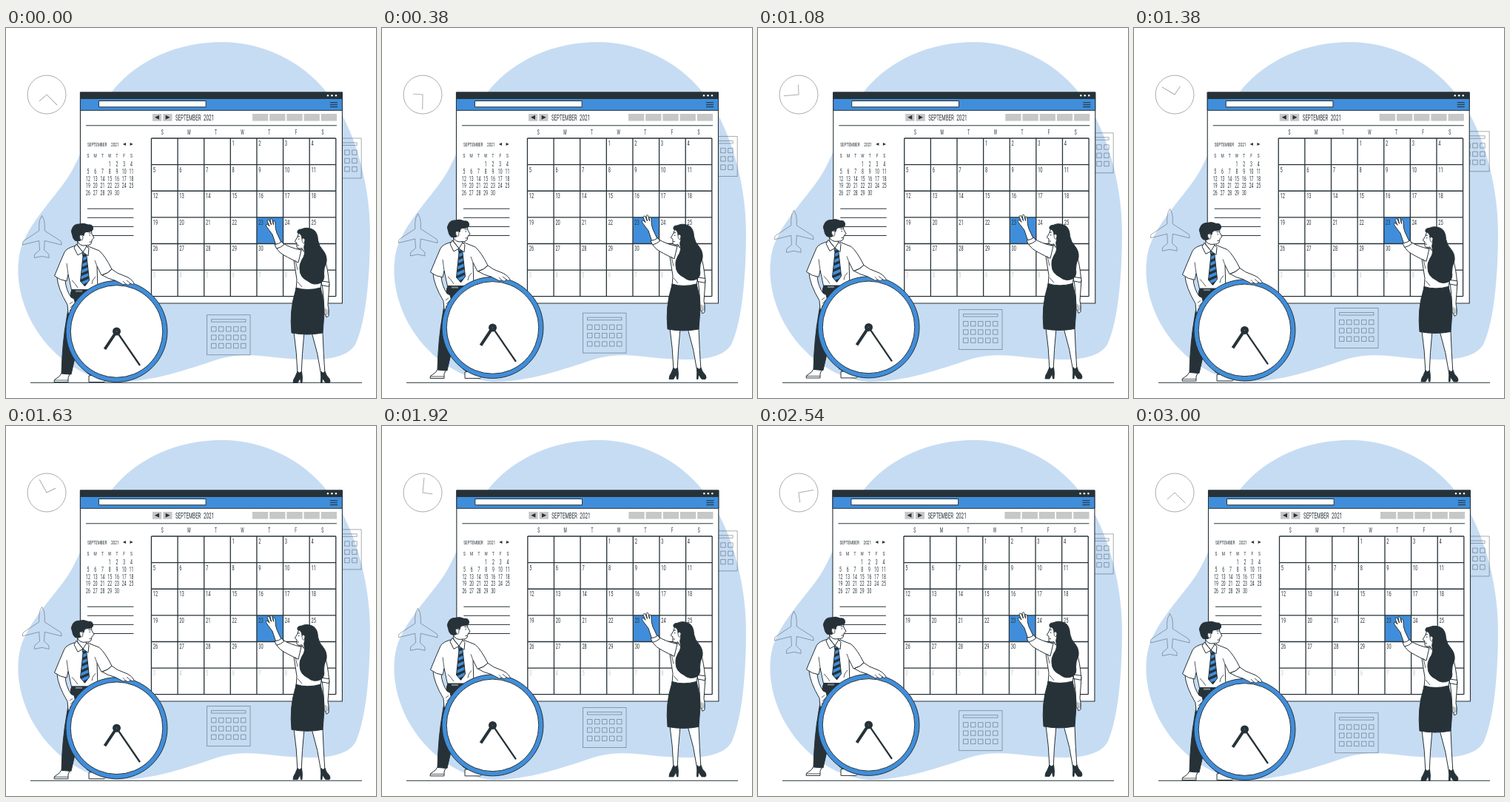
Recreate the animation shown at these times as an HTML page with a canvas. Size 500 by 500 pixels, loop 3.04 s.

```html
<!DOCTYPE html>
<html lang="en">
<head>
<meta charset="utf-8">
<title>Calendar planning</title>
<style>
html, body { margin: 0; width: 100%; height: 100%; overflow: hidden; background: #fff; }
canvas { display: block; width: 100vw; height: 100vh; }
</style>
</head>
<body>
<canvas id="stage"></canvas>
<script>
const SIZE = 500, LOOP = 3040, CYCLE = 3000;
const BLUE = '#408edb', PALE = '#c6dcf3', DARK = '#263238', GREY = '#c7c7c7', WHITE = '#fff';
const FAINT = 'rgba(38,50,56,.4)';
const CONDENSE = 0.6;
const SHAKE = [0, -1, 2, -4, 4, -4, 4, -4, 2, -1, 0];
const DAYS = [...'SMTWTFS'];

const canvas = document.getElementById('stage');
const ctx = canvas.getContext('2d');

function shape(d, fill, stroke = DARK, width = 1) {
  const p = new Path2D(d);
  if (fill) { ctx.fillStyle = fill; ctx.fill(p); }
  if (stroke) { ctx.strokeStyle = stroke; ctx.lineWidth = width; ctx.stroke(p); }
}
function line(x1, y1, x2, y2, width = 1, color = DARK) {
  shape(`M${x1} ${y1}L${x2} ${y2}`, null, color, width);
}
function box(x, y, w, h, fill, stroke, width = 1) {
  shape(`M${x} ${y}h${w}v${h}h${-w}Z`, fill, stroke || null, width);
}
function disc(x, y, r, fill, stroke, width = 1) {
  shape(`M${x - r} ${y}a${r} ${r} 0 1 1 ${2 * r} 0a${r} ${r} 0 1 1 ${-2 * r} 0Z`, fill, stroke || null, width);
}
function label(text, x, y, size, color = DARK, align = 'left') {
  ctx.save();
  ctx.translate(x, y);
  ctx.scale(CONDENSE, 1);
  ctx.font = `${size}px Roboto, "Liberation Sans", sans-serif`;
  ctx.textAlign = align;
  ctx.fillStyle = color;
  ctx.fillText(text, 0, 0);
  ctx.restore();
}
function moved(x, y, draw) {
  ctx.save();
  ctx.translate(x, y);
  draw();
  ctx.restore();
}

// Linear rise of 10px and back over one period
const float = (t, period) => -10 * (1 - Math.abs(1 - 2 * (t % period) / period));

function shake(t) {
  const p = t ? Math.min(10, (t + 16) / CYCLE * 10) : 0;
  const i = Math.min(9, Math.floor(p));
  return SHAKE[i] + (SHAKE[i + 1] - SHAKE[i]) * (p - i);
}

function blob() {
  shape('M292 19C348 19 400 46 431 84C470 127 492 210 492 275C492 340 486 398 472 428' +
    'C456 452 412 449 372 446C334 442 318 440 289 447C242 462 200 478 150 478' +
    'C100 474 58 440 35 398C14 358 13 320 21 295C36 256 68 228 88 195' +
    'C108 160 120 112 148 80C180 44 230 19 292 19Z', PALE, null);
}

function smallClock(t) {
  disc(55, 90, 26, WHITE, FAINT);
  ctx.save();
  ctx.translate(55, 90);
  ctx.rotate(t / CYCLE * Math.PI * 2);
  shape('M14.3 14.3L0 0L-10 9', null, FAINT);
  ctx.restore();
}

function plane() {
  shape('M48.5 253.5Q52.3 259 52.3 266V274L74 288Q75.5 290 75 293L52.3 287.5L51.5 300L57.5 305.5' +
    'Q58.5 308 58 310.5L48.5 308.5L38.5 310.5Q38 308 39 305.5L45.5 300L44.7 287.5L22.5 293' +
    'Q22 290 23.5 288L44.7 274V266Q44.7 259 48.5 253.5Z', null, FAINT);
}

function smallCalendar() {
  box(0, 0, 58.5, 54, null, FAINT);
  box(6, 6, 46.5, 3.5, null, FAINT);
  for (let r = 0; r < 3; r++)
    for (let c = 0; c < 5; c++) box(6 + c * 10, 16 + r * 11.3, 6.5, 6.3, null, FAINT);
}

function arrow(x, y, dir, s) {
  shape(`M${x - dir * s} ${y - s}V${y + s}L${x + dir * s} ${y}Z`, DARK, null);
}

function miniMonth() {
  label('SEPTEMBER', 110, 159.8, 7.8);
  label('2021', 142, 159.8, 8);
  arrow(160, 157, -1, 2.1);
  arrow(169.7, 157, 1, 2.1);
  const colX = c => 111 + c * 9.75;
  DAYS.forEach((d, c) => label(d, colX(c), 175.3, 8, DARK, 'center'));
  for (let d = 1; d <= 30; d++) {
    const n = d + 2;
    label(d, colX(n % 7), 186.8 + Math.floor(n / 7) * 9.85, 8.5, DARK, 'center');
  }
  for (let i = 0; i < 4; i++) line(110, 244.2 + i * 12.1, 172.5, 244.2 + i * 12.1);
}

function browser() {
  box(100.5, 87, 354, 285, WHITE, DARK, 1.1);
  box(100.5, 95.3, 354, 16, BLUE, DARK, 1);
  box(100.5, 87, 354, 8.3, DARK, DARK, 1);
  for (let i = 0; i < 3; i++) {
    disc(435 + i * 5.5, 91.2, 1.3, WHITE);
    line(438, 100.8 + i * 2.9, 448, 100.8 + i * 2.9, 1.1);
  }
  box(125.5, 98.5, 144.7, 8.3, WHITE, DARK);
  box(198, 116, 12.3, 9.8, GREY);
  box(212.3, 116, 12.3, 9.8, GREY);
  arrow(204, 120.8, -1, 3);
  arrow(218.7, 120.8, 1, 3);
  label('SEPTEMBER', 229, 124.6, 10.2);
  label('2021', 267, 124.6, 10.6);
  for (let i = 0; i < 5; i++) box(333 + i * 23.2, 116, 21.3, 9.6, GREY);
  line(108, 131.8, 447, 131.8);
  miniMonth();

  const gx = 196.5, gy = 149, step = 35.62;
  box(gx + 4 * step, gy + 3 * step, step, step, BLUE);
  DAYS.forEach((d, c) => label(d, 211.3 + c * 36.1, 144, 8.2, DARK, 'center'));
  for (let i = 0; i < 8; i++) line(gx + i * step, gy, gx + i * step, gy + 6 * step, 1.3);
  for (let i = 0; i < 7; i++) line(gx, gy + i * step, gx + 7 * step, gy + i * step, 1.3);
  for (let n = 3; n < 42; n++) {
    const d = n - 2, next = d > 30;
    label(next ? d - 30 : d, gx + 2.3 + (n % 7) * step, gy + 10 + Math.floor(n / 7) * step,
      9.5, next ? GREY : DARK);
  }
}

function tie() {
  const d = 'M103 304L108.5 304L109 308.5L112.5 341L106.5 349L100.5 342L104 308.5Z';
  shape(d, BLUE, null);
  ctx.save();
  ctx.clip(new Path2D(d));
  for (let y = 309; y < 358; y += 8) line(96, y + 3, 116, y - 6, 3.4);
  ctx.restore();
  shape(d, null);
}

function man() {
  // Legs and shoes
  shape('M100 435L109 466L116 471L128 470L125 420Z', DARK, null);
  shape('M112 470Q121 468 127 473L133 475Q135 478 133 478.5H112Z', WHITE);
  shape('M88 356H122V395L98 424L88 468L75 467Q76 425 82 392Z', DARK);
  shape('M74.5 467L86 468Q83 472 84 478.5H65Q64 475 69 473Q73 471 74.5 467Z', WHITE);
  shape('M65 476H84', null, DARK, .8);
  // Far arm
  shape('M69 337Q70 352 83 374L84 385Q86 390 89 386L94 374L92 366L88 364Q81 354 80 341Z', WHITE);
  shape('M86 373L90 370M87 378L92 373M86 382L92 377', null, DARK, .8);
  // Neck and shirt
  shape('M96 283L97 294L104 303L109 301L108 290Z', WHITE);
  shape('M95 294Q82 297 79 303Q72 319 65.5 335Q73 341 82 342L84 333L88.5 354H124L123 322' +
    'L129 334Q138 332 143 326Q134 308 126 301L111 295L104 303Z', WHITE);
  shape('M84 333L82 318M123 322L120 314M89 341Q94 346 97 351M121 336Q116 341 116 346', null, DARK, .8);
  box(88.5, 353.7, 34, 4, DARK, DARK);
  box(94, 354.5, 9, 2.2, '#77858c');
  tie();
  shape('M95 292L92 297L97 307L104 303Z', WHITE);
  shape('M109 295L112 298L111 308L104 303Z', WHITE);
  // Head
  shape('M95 284Q97 293 104 294L112 293.5Q116 292 115.6 289L116.3 286L119 283.5L115.8 278L115.5 271' +
    'L101 271Z', WHITE);
  shape('M93 287Q90 284 89.5 279Q87 274 90 270Q92 265 99 265Q105 263 111 266Q118 265 117.5 272' +
    'Q116 276 108 275.5Q105 277 105 281Q103 278 101 280Q99 283 101 287Q97 289 93 287Z', DARK);
  shape('M104 282Q101 278 99.5 281Q99 285 102.5 287Q104 286 104 282Z', WHITE, DARK, .8);
  disc(113.2, 280, .75, DARK);
  shape('M111.5 277.2L114.8 277M112.5 289.2L115.4 288.8', null, DARK, .9);
}

function bigClock() {
  disc(149.5, 410, 68.5, BLUE, DARK);
  disc(149.5, 410, 62.3, WHITE, DARK);
  line(149.5, 410, 181, 456, 2.3);
  line(149.5, 410, 133.5, 434, 4);
  disc(149.5, 410, 5.5, DARK);
  disc(149.5, 410, .7, '#69777e');
}

function nearArm() {
  shape('M143 326Q150 332 160 335Q169 338 173 345Q172 348 168 345Q166 349 162 346Q158 348 155 345' +
    'L147 341Q138 339 130 334Q139 331 143 326Z', WHITE);
  shape('M168 345L163 341M162 346L158 342', null, DARK, .8);
}

function woman() {
  // Legs and shoes
  shape('M389 411Q393 438 394 468L399 470Q400 440 403 411Z', WHITE);
  shape('M413 411Q422 440 426 470L431 468Q429 440 428 411Z', WHITE);
  shape('M394 464Q396 468 399.5 464Q401 472 400 479.5H398.5L397.5 473L394 479.5H388Q388 475 391 471Z', DARK);
  shape('M426 464Q428 468 431 464Q432 469 437 474Q439 478 437 479.5H432L427.5 473L427 479.5H425.5Z', DARK);
  // Lowered arm
  shape('M427 344L429 364L430 381Q429 386 432 388L433 391L436 389Q437 381 435 374L437 346Z', WHITE);
  shape('M432 379L433 388M435 380L435 387', null, DARK, .7);
  shape('M424 311L431 313Q435 326 436.5 344L427 346L423 331Z', WHITE);
  shape('M426.5 342L437 343.5L436.5 349.5L426.5 347.5Z', WHITE);
  // Blouse and raised arm
  shape('M395 299Q407 300 421 301Q434 314 427 337L425 354H392L393 340L389 314Z', WHITE);
  shape('M360 279L354 271Q350 266 352 265Q354 265 356 268L353 261Q353 258 356 260L358.5 266L357 259' +
    'Q359 256 360 260L361.5 266L361 261Q363 259 364 264Q363.5 271 366 277L373 292L366 297Z', WHITE);
  shape('M373 290Q383 297 399 300L395 317Q378 309 371 304Q366 300 364 293.5Z', WHITE);
  shape('M363 292.5Q369 292 373 288.5L375.5 293Q371 297 365.5 298Z', WHITE);
  shape('M391 314L394 327M394 343L400 350', null, DARK, .8);
  // Skirt
  shape('M392 351Q407 356 425 351Q430 367 430 385L428 412Q407 416 386 412Q383 381 391 356Z', DARK);
  // Head
  shape('M396 276L393.6 283L390.3 288.5L393 290.5L393 296Q394 299 400 297.5L402 302L412 296L410 274Z', WHITE);
  disc(395.7, 285.3, .75, DARK);
  shape('M394 282L397 281.6M393.5 293.5L396 293.8', null, DARK, .9);
  shape('M394 277Q393 272 399 272Q406 268.5 414 272Q421 275 421.5 287Q423 295 428 300Q434 307 433 316' +
    'Q429 325 429.5 332Q431 340 426 344Q416 349 408 342Q397 337 397 326Q396 320 400 313' +
    'Q405 306 403 299Q402 296 404 291Q401 290 400 285Q400 278 394 277Z', DARK);
  shape('M404 286Q401 282 400 286Q400 291 403 291Z', WHITE, DARK, .7);
}

function draw(t) {
  const slow = float(t, CYCLE), quick = float(t, CYCLE / 2);
  ctx.fillStyle = WHITE;
  ctx.fillRect(0, 0, SIZE, SIZE);
  blob();
  smallClock(t);
  moved(0, slow, plane);
  moved(271.5, 387.7 + slow, smallCalendar);
  moved(421.7, 149 + slow, smallCalendar);
  line(33, 479.2, 481, 479.2, 1.1);
  moved(shake(t), 0, browser);
  moved(0, quick, () => { man(); bigClock(); nearArm(); woman(); });
}

function tick(now) {
  const w = Math.round(innerWidth * devicePixelRatio), h = Math.round(innerHeight * devicePixelRatio);
  if (canvas.width !== w || canvas.height !== h) { canvas.width = w; canvas.height = h; }
  ctx.setTransform(w / SIZE, 0, 0, h / SIZE, 0, 0);
  ctx.lineJoin = 'round';
  draw(Math.min(now % LOOP, CYCLE));
  requestAnimationFrame(tick);
}
requestAnimationFrame(tick);
</script>
</body>
</html>
```
